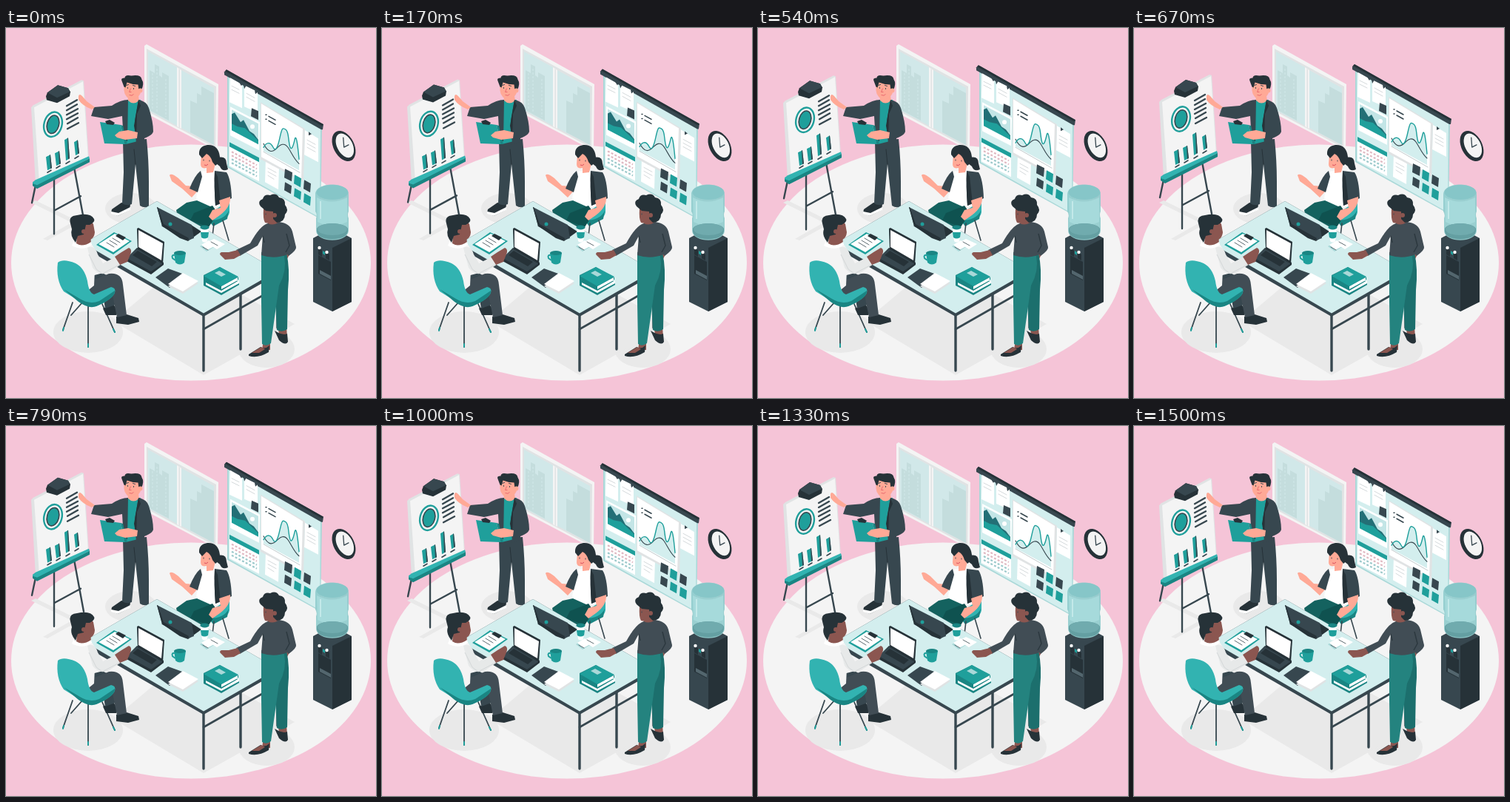
Write an HTML page that moves like this. It is 500 px wide and 500 px high and loops after 1540 ms.

```html
<!DOCTYPE html>
<html lang="en">
<head>
<meta charset="utf-8">
<title>Office meeting</title>
<style>
html, body { margin: 0; height: 100%; overflow: hidden; background: #f5c4d7; }
svg { display: block; width: 100vw; height: 100vh; }
.white { fill: #fff; }
.paper { fill: #f4f4f4; }
.shade { fill: #e9e9e9; }
.grey { fill: #e0e3e4; }
.ice { fill: #d3eeee; }
.mist { fill: #a9d8d8; }
.aqua { fill: #32b3b1; }
.teal { fill: #1f9f9b; }
.deep { fill: #1a8583; }
.pine { fill: #14625f; }
.dark { fill: #37474f; }
.slate { fill: #414d55; }
.ink { fill: #263238; }
.skin { fill: #ffa996; }
.brown { fill: #8b5650; }
.line { fill: none; stroke: #37474f; stroke-linecap: round; stroke-linejoin: round; }
</style>
</head>
<body>
<svg viewBox="0 0 500 500" preserveAspectRatio="none">
  <ellipse class="paper" cx="250" cy="317" rx="243" ry="159.5"/>

  <g id="shadows" class="shade">
    <ellipse cx="169" cy="244" rx="35" ry="21"/>
    <ellipse cx="111" cy="411" rx="47" ry="28"/>
    <ellipse cx="352" cy="434" rx="38" ry="25"/>
    <path d="M34 236 40 233 95 260 93 265ZM50 285 101 256 105 260 56 287Z"/>
    <path d="M145 396 267 469 390 400 300 350 200 350Z"/>
  </g>

  <g id="window">
    <path class="paper" d="M187 24 190 22 287 76 286 166 187 114Z"/>
    <path class="grey" d="M190 28 284 79 283 162 190 112Z"/>
    <path fill="#d1e8e9" d="M192 32 231 53V132L192 111ZM237 57 281 81V158L237 135Z"/>
    <path fill="#c4dddd" d="M194 57 201 61V49L207 52V64L211 67V60L220 65V125L194 111ZM249 98 258 102V88L264 91V79L281 88V158L249 141Z"/>
    <path fill="none" stroke="#d1e8e9" stroke-dasharray="3 2" d="M198 61V110M204 55V113M216 69V120"/>
    <path class="paper" d="M231 53 237 57V136L231 133Z"/>
    <path class="grey" d="M233.5 55 235 56V135L233.5 134Z"/>
  </g>

  <g id="wallBoard" class="float">
    <path class="mist" d="M299 58 427 129 425 253 299 183Z"/>
    <path class="ice" d="M301 60 425 129 424 251 301 182Z"/>
    <path class="dark" d="M295 54 298 51 429 125 428 132 426 132 295 58Z"/>
    <path class="ink" d="M296 53 298 51 429 125 427 127Z"/>
    <path class="white" d="M303 62 319 71V103L302 95ZM322 72 340 81V109L322 101ZM404 133 422 144V176L403 166ZM351 171 369 182 368 213 350 203Z"/>
    <path class="line" style="stroke:#d5dadc" d="M305 73 315 78M305 78 315 83M325 83 336 89M325 88 336 94M407 146 418 152M407 151 418 157M407 156 418 162M354 184 365 190M354 189 365 195M354 194 362 199"/>
    <path class="dark" d="M315 68 321 68 318 73ZM321 72 325 72 322 77ZM336 79 342 80 337 84ZM409 135 413 138 409 140ZM359 175 363 178 359 180Z"/>
    <path class="dark" d="M332 103 341 107V119L331 114Z"/>
    <path class="white" d="M303 101 343 122 342 160 303 140Z"/>
    <path fill="#c3e5e6" d="M305 105 341 124V151L305 132Z"/>
    <path fill="#236f76" d="M305 111 309 109 317 122 321 119 329 134 335 138 341 146V151L305 132Z"/>
    <path class="teal" d="M305 124 313 128 323 130 341 147V152L305 133Z"/>
    <circle class="white" cx="333" cy="128" r="3"/>
    <path class="white" d="M302 149 342 170V202L302 181Z"/>
    <path class="teal" d="M302 149 342 170V176L302 155Z"/>
    <g fill="none" stroke-dasharray="3 2.3" stroke-width="2.2">
      <path stroke="#e0b9c2" d="M305 162 339 180M305 167 339 185"/>
      <path stroke="#9cc9cb" d="M305 172 339 190M305 177 339 195"/>
    </g>
    <path class="grey" d="M344 95 404 131 402 203 344 172Z"/>
    <path class="white" d="M345 97 401 131 399 199 345 169Z"/>
    <path class="ice" d="M348 156C353 147 358 150 361 156S367 157 370 143 374 129 378 132 381 141 383 152 388 155 390 146 394 150 396 172V187L348 161Z"/>
    <path class="line" stroke-width="1.5" d="M351 112h1M355 114 364 119M351 118h1M355 120 364 125"/>
    <path class="line" stroke-width="1.1" d="M348 151C355 165 361 162 366 157S376 149 381 156 389 172 396 178"/>
    <path class="line" style="stroke:#1f9f9b" stroke-width="1.4" d="M348 156C353 147 358 150 361 156S367 157 370 143 374 129 378 132 381 141 383 152 388 155 390 146 394 150 396 172"/>
    <path class="line" style="stroke:#c2cbcd" d="M348 162 397 190"/>
    <path class="dark" d="M377 185 387 190 386 202 376 197ZM403 200 412 205 411 217 402 212ZM377 203 386 208 385 219 376 214Z"/>
    <path class="teal" d="M390 193 399 198 398 210 389 205ZM390 211 399 216 398 227 389 222ZM403 218 412 223 411 235 402 230Z"/>
  </g>

  <g id="clock" transform="rotate(-27 456.5 159.5)">
    <ellipse class="ink" cx="456.5" cy="159.5" rx="14" ry="22"/>
    <ellipse class="paper" cx="458" cy="159.5" rx="10.5" ry="17.5"/>
    <path class="line" stroke-width="1.3" d="M461 149 456 161 463 161"/>
  </g>

  <g id="cooler">
    <path class="dark" d="M415 284 441 270 467 284 467 370 441 383 415 370Z"/>
    <path class="ink" d="M441 297 467 284V370L441 383Z"/>
    <path class="ink" d="M422 307 439 316V341L422 332Z"/>
    <path fill="#53666e" d="M424 327 439 335V340L424 332Z"/>
    <path class="ink" d="M422 297 427 300V309L422 306ZM432 303 437 306V314L432 311Z"/>
    <circle class="white" cx="423.5" cy="297" r="2.2"/>
    <circle class="white" cx="433.5" cy="303" r="2.2"/>
    <path class="teal" d="M428 301 431 303V307L428 305Z"/>
    <path fill="#92cdce" fill-opacity=".92" d="M418 225C418 207 463 207 463 225V248Q461 252 463 257V274C462 291 420 291 419 274V257Q421 252 418 248Z"/>
    <ellipse cx="441" cy="222" rx="21.5" ry="10" fill="#86c6c8"/>
    <path fill="#a6dadb" d="M420 229Q440 240 461 229V262Q440 272 421 262Z"/>
    <path fill="#649fa2" d="M420 271C424 262 458 262 462 271V275C460 289 421 289 420 275Z"/>
    <ellipse cx="441" cy="272" rx="20" ry="8" fill="#70abae"/>
    <path fill="none" stroke="#c3e9e9" stroke-width="2" d="M425 234V258"/>
  </g>

  <g id="flipChart" class="float">
    <path class="line" stroke-width="2.4" d="M40 207 35 231M65 199V273M92 183 105 253M66 241 101 222"/>
    <path class="grey" d="M34 102 37 99 102 65 105 66 112 173 44 206 40 205Z"/>
    <path class="paper" d="M38 102 104 67 111 172 45 204Z"/>
    <path class="aqua" d="M36 203 40 200 112 168 113 171 42 208 36 206Z"/>
    <path class="deep" d="M42 207 113 171V176L42 212 36 208V205Z"/>
    <path class="ink" d="M54 87 56 82 70 72 84 76 87 81 86 87 69 96 55 92Z"/>
    <path class="dark" d="M56 82 70 72 84 76 86 81 69 89Z"/>
    <g transform="rotate(15 63.5 125)">
      <ellipse cx="63.5" cy="125" rx="12" ry="17" fill="none" stroke="#1f9f9b" stroke-width="2.4"/>
      <ellipse class="teal" cx="63.5" cy="125" rx="8" ry="12.5" stroke="#37474f" stroke-width="1.6"/>
    </g>
    <path class="line" stroke-width="2.3" d="M82 100 96 92M82 106 96 98M82 112 97 104M82 118 97 110M83 124 97 116M83 131 98 123"/>
    <path class="teal" d="M54 169 60 166 62 184 56 187ZM66 164 72 161 74 178 68 181ZM79 146 84 143 86 171 81 174ZM92 149 97 146 99 164 94 167Z"/>
    <path class="dark" d="M59 166 60 166 62 184 60 185ZM71 161 72 161 74 178 72 179ZM83 144 84 143 86 171 84 172ZM96 147 97 146 99 164 97 165Z"/>
    <path class="line" stroke-width="1.6" d="M56 190 61 187M68 184 73 181M81 178 86 175M93 171 98 168"/>
  </g>

  <g id="presenter">
    <path class="ink" d="M143 245 156 236 168 238 167 246 151 254 142 250ZM182 234 193 234 193 242 184 240Z"/>
    <path class="white" d="M142 248 152 250 168 242V246L151 254 142 251Z"/>
    <path class="dark" d="M158 152 190 150Q193 180 193 207V241Q187 244 181 240L175 184 170 238Q163 241 157 237L159 195Z"/>
    <path class="line" style="stroke:#263238" d="M175 184 173 164"/>
    <path class="teal" d="M164 97 182 97 186 151 162 157Z"/>
    <path class="skin" d="M164 89 178 86 180 98Q172 105 165 98Z"/>
    <path class="dark" d="M165 97Q155 97 143 105L119 107 115 119 138 123 157 119 159 153 164 153Z"/>
    <path class="dark" d="M179 97Q190 99 193 108 199 127 199 140 197 147 177 152L175 143 187 137V154L176 158 174 125Z"/>
    <path class="ink" d="M179 97 182 105 177 116 176 150 173 132Z"/>
    <path class="skin" d="M120 107 109 99 103 92Q99 88 98 92L98 97Q103 105 116 110Z"/>
    <g transform="translate(.5 -1.5)">
      <path class="skin" d="M159 77Q162 70 179 75L182 86Q181 96 170 98 160 96 159 86Z"/>
      <path class="ink" d="M159 81 156 73Q154 69 160 69 160 64 169 66 182 64 183 71 187 77 182 86L179 86 178 78Q170 78 163 75L161 82Z"/>
      <circle class="skin" cx="181" cy="86" r="3"/>
      <path class="line" stroke-width="1" d="M164 82v1M172 83v1M162 79 165 78M171 79 174 80"/>
      <path fill="none" stroke="#e96c70" d="M168 83 166 88 169 88M166 92Q170 94 172 91"/>
    </g>
    <path class="teal" d="M127 127 155 131 161 157 133 156Z"/>
    <path class="deep" d="M155 131 158 132 164 157 161 157Z"/>
    <path class="ink" d="M134 126 140 124 147 128 145 131 136 130Z"/>
    <path class="skin" d="M178 141 165 138 153 140 147 145 150 148 161 151 177 149Z"/>
  </g>

  <g id="seatedWoman">
    <path class="aqua" d="M276 250 302 233 302 249Q300 260 281 264Z"/>
    <path class="deep" d="M274 260Q295 260 301 247L299 258 280 268Z"/>
    <path class="line" stroke-width="1.6" d="M293 260 301 287M281 264 279 281"/>
    <path class="white" d="M260 196Q272 190 287 195L289 241 256 239 259 216Z"/>
    <path class="pine" d="M244 236 258 233 278 242 277 262 264 273 232 255 230 246Z"/>
    <path fill="#0f5250" d="M254 250 279 240 286 250 274 269 249 260Z"/>
    <path class="skin" d="M254 214 243 213 233 203Q223 195 221 199L224 207 238 217 251 229 260 219Z"/>
    <path class="dark" d="M263 193Q255 199 248 217L259 222 265 201Z"/>
    <path class="dark" d="M282 193 298 195Q304 204 305 230L288 238 283 240Q281 213 282 193Z"/>
    <path class="ink" d="M286 201 290 237 283 240Q281 213 282 193Z"/>
    <path class="skin" d="M288 233 303 228Q304 242 289 253L279 260 274 255 279 246 290 243Z"/>
    <path class="ink" d="M283 176Q298 171 298 183L300 191Q292 195 289 187L284 183Z"/>
    <path class="skin" d="M264 171Q270 165 282 172L283 183 280 195 271 196V189Q263 191 263 184Z"/>
    <path class="ink" d="M261 171Q260 160 272 158 287 157 289 174 289 182 283 186L279 181Q277 173 271 170L265 176Z"/>
    <path class="line" stroke-width="1" d="M267 178v1M275 179v1"/>
    <path fill="none" stroke="#db4f5e" d="M268 185Q271 187 273 184"/>
  </g>

  <g id="table">
    <path class="line" stroke-width="3.4" d="M267 386V463M317 358V434M367 330V405"/>
    <path class="line" stroke-width="2.6" d="M267 407 367 350"/>
    <path class="dark" d="M105 291 204 234 367 328V333L267 390 105 297Z"/>
    <path class="ice" d="M105 291 204 234 367 328 267 385.5Z"/>
  </g>

  <g id="tableItems">
    <path class="ink" d="M210 267 250 266 264 275 246 288 235 284Z"/>
    <path class="dark" d="M204 242 251 266 254 284 246 287 211 267Z"/>
    <path class="ink" d="M204 242 205 242 213 265 247 284 246 287 211 268Z"/>
    <circle class="teal" cx="222" cy="265" r="2.5"/>
    <path class="white" d="M263 270 274 270 272 288Q268 291 265 288Z"/>
    <path class="teal" d="M263 276 274 276 273 283Q268 286 264 283Z"/>
    <ellipse class="deep" cx="268.5" cy="269.5" rx="6" ry="3"/>
    <path class="mist" d="M262 295 272 289 281 296 271 302Z"/>
    <path class="white" d="M264 293 274 287 283 294 272 300ZM271 290 281 285 296 292 285 299Z"/>
    <path class="line" stroke-width=".8" d="M266 296 273 300M277 289 286 294"/>
    <path class="teal" d="M227 304H243L241 317Q235 322 229 317Z"/>
    <path fill="none" stroke="#1f9f9b" stroke-width="2" d="M229 307Q223 306 225 311L229 314"/>
    <ellipse class="deep" cx="235" cy="304" rx="8" ry="3"/>
    <path class="dark" d="M202 337 219 325 241 333 221 351Z"/>
    <path class="grey" d="M219 349 239 334 260 345 239 359Z"/>
    <path class="white" d="M219 346 239 331 260 342 239 356Z"/>
    <path class="deep" d="M267 341 290 329 315 343V347L291 361 267 348Z"/>
    <path class="white" d="M270 344 291 355 315 341V345L291 358 270 347Z"/>
    <path class="deep" d="M267 334 289 323 314 337V340L291 354 267 341Z"/>
    <path class="white" d="M291 349 313 337V341L291 353Z"/>
    <path class="teal" d="M267 335 289 323 314 336 291 349Z"/>
    <path class="mist" d="M282 331 288 328 297 333 291 336Z"/>
    <path class="teal" d="M122 293 146 276 170 288 145 306Z"/>
    <path class="white" d="M125 292 147 278 167 288 145 303Z"/>
    <path class="ink" d="M148 281 152 278 162 283 158 287Z"/>
    <path class="line" stroke-width=".8" d="M136 290 146 296M140 287 150 293M144 284 154 290"/>
    <path class="ink" d="M163 311 177 297 213 317V320L196 333 163 315Z"/>
    <path class="dark" d="M163 311 177 298 212 318 196 329Z"/>
    <path class="ink" d="M171 307 178 301 204 316 197 322Z"/>
    <path class="ink" d="M177 271 179 270 214 289 212 319 178 299Z"/>
    <path class="white" d="M179 273 212 291 210 314 179 296Z"/>
  </g>

  <g id="seatedMan">
    <path class="line" stroke-width="1.8" d="M90 371 77 408M104 370 88 388M111 375V431M130 373 147 411"/>
    <path class="line" style="stroke:#1f9f9b" stroke-width="2" d="M78 405 77 409M111 427V431M145 407 147 411"/>
    <path class="ink" d="M131 379 145 373 151 382 149 388 135 388ZM149 390 163 387 179 392 180 397 165 401 149 399Z"/>
    <path class="dark" d="M108 337 131 331 145 340 148 374 134 379 130 355 105 356Z"/>
    <path class="slate" d="M105 352 117 341 139 332Q157 330 158 347L163 388 150 391 143 356 123 366 105 364Z"/>
    <path class="paper" d="M75 322Q80 302 92 290L113 290Q122 297 121 307L119 348 103 361 76 343Z"/>
    <path class="brown" d="M96 279 114 279 115 291Q106 298 95 291Z"/>
    <path class="brown" d="M101 262Q113 257 118 265L120 276Q119 287 108 287L99 279Z"/>
    <path class="ink" d="M87 264Q84 254 96 253 114 249 119 258 121 262 113 266L108 266 105 279 97 281 94 290Q86 280 89 272Z"/>
    <circle class="brown" cx="105" cy="275" r="3"/>
    <path class="white" d="M91 289Q102 298 115 289L116 293Q104 302 89 294Z"/>
    <path fill="#e7e9e9" d="M110 297Q120 292 124 306L131 318 149 309 156 319 137 332Q125 334 117 324Z"/>
    <path fill="none" stroke="#d3d7d8" d="M112 306 122 326 130 332 155 319"/>
    <path class="brown" d="M147 309 156 303 166 297Q171 299 168 306L164 316 154 320Z"/>
    <path class="aqua" d="M70 317Q77 311 94 318 106 324 110 342 112 358 119 360L142 350Q149 351 147 358 143 367 122 376 112 378 99 369L78 356Q67 340 70 317Z"/>
    <path class="deep" d="M78 353 100 366Q113 374 126 369L147 355Q148 365 122 376 112 380 98 370Z"/>
  </g>

  <g id="standingWoman">
    <path class="brown" d="M348 421H357V435H346ZM367 403H379L380 418 369 413Z"/>
    <path class="ink" d="M328 441 344 431Q350 435 356 429L355 438Q340 447 328 443ZM363 409Q374 416 380 413L381 424Q378 430 369 422Z"/>
    <path class="brown" d="M332 439 345 431 350 434 342 439Z"/>
    <path class="brown" d="M383 306 378 316 373 312 379 302Z"/>
    <path fill="#1c6f6d" d="M345 303 379 304Q384 325 381 354L380 407Q373 412 366 408L363 349Z"/>
    <path fill="#24837f" d="M345 304 376 308Q380 328 369 348L358 426Q352 431 346 427L345 370Z"/>
    <path class="brown" d="M355 258 368 255 371 267Q362 273 353 267Z"/>
    <path class="slate" d="M354 264Q361 268 369 262 384 264 387 275L392 296Q393 300 382 308L377 302 382 295 380 306Q363 313 345 307L347 281 340 294 316 308 311 300 330 291Q343 267 354 264Z"/>
    <path fill="none" stroke="#2c383f" stroke-width="1.5" d="M379 278 383 294 378 303M347 281 349 290"/>
    <path class="brown" d="M313 300 301 303 291 303Q287 305 291 308L296 313 308 312 317 307Z"/>
    <path class="brown" d="M348 244Q357 239 367 247L366 259Q360 265 350 263 347 258 348 244Z"/>
    <path class="ink" d="M344 241Q339 234 347 231 349 224 357 226 365 222 369 229 378 230 377 239 383 246 377 252 377 262 366 263L361 258 361 248 351 247Z"/>
    <circle class="brown" cx="363" cy="253" r="3"/>
    <path class="line" stroke-width="1" d="M351 251v1"/>
  </g>
</svg>
<script>
const LOOP = 1540, SWING = 3.8, REST = 1.5;
const floaters = document.querySelectorAll('.float');

function draw(now) {
  const y = REST + SWING * Math.cos(2 * Math.PI * now / LOOP);
  for (const part of floaters) part.setAttribute('transform', `translate(0 ${y.toFixed(3)})`);
  requestAnimationFrame(draw);
}
draw(performance.now());
</script>
</body>
</html>
```
